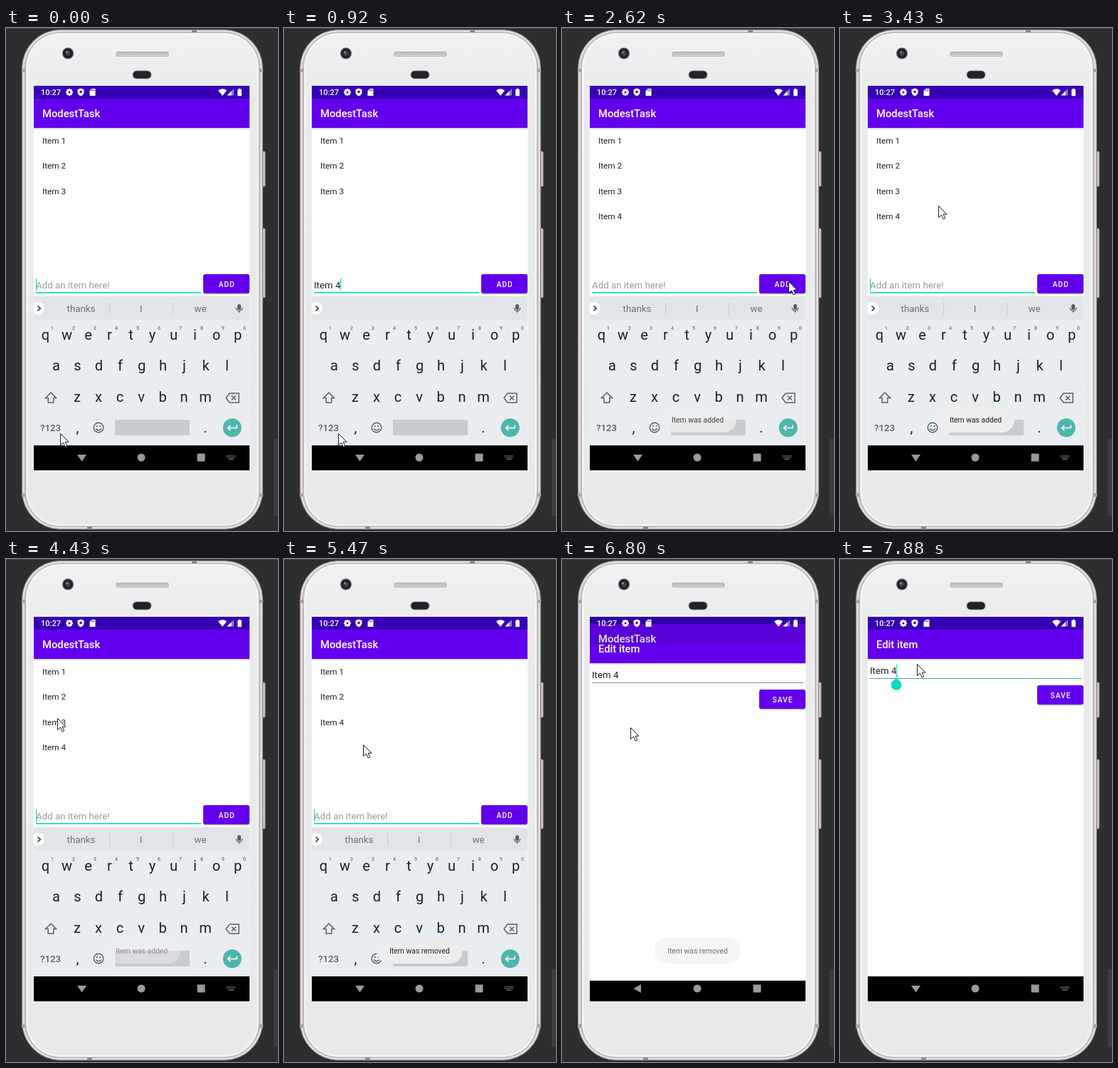
Write an HTML page with a canvas that moves like this. It is 382 px wide and 705 px high and loops after 8 s.

```html
<!DOCTYPE html>
<html lang="en">
<head>
<meta charset="utf-8">
<title>Todo demo</title>
<style>
  html, body { margin: 0; width: 100%; height: 100%; overflow: hidden; background: #2d2e30; }
  canvas { display: block; width: 382px; height: 705px; }
</style>
</head>
<body>
<canvas id="stage"></canvas>
<script>
const W = 382, H = 705, LOOP = 8000;
const PURPLE = '#6200ee', DEEP = '#3700b3', TEAL = '#03dac5', INK = '#212121', KEY = '#10242e', KEY_ICON = '#53626a';
const canvas = document.getElementById('stage');
const c = canvas.getContext('2d');
const dpr = window.devicePixelRatio || 1;
canvas.width = W * dpr;
canvas.height = H * dpr;

const clamp = v => Math.max(0, Math.min(1, v));
const ramp = (t, start, length) => clamp((t - start) / length);

const BURSTS = [[0, 0, 1], [120, 370, 3], [640, 640, 1], [920, 920, 1], [1190, 1920, 6],
  [2210, 2470, 3], [2620, 3130, 5], [3290, 4270, 8], [4430, 5470, 9], [5630, 6280, 6],
  [6680, 6680, 1], [6800, 7610, 7], [7740, 7880, 2]];
const TICKS = BURSTS.flatMap(([a, b, n]) =>
  Array.from({ length: n }, (_, i) => n > 1 ? a + (b - a) * i / (n - 1) : a));
const snap = t => TICKS.filter(tick => tick <= t + 0.01).pop();

const MOUSE = [[0, 76, 568], [1060, 76, 568], [1340, 170, 500], [1630, 344, 349], [1920, 318, 355],
  [2700, 318, 355], [3130, 200, 282], [3700, 82, 220], [4000, 72, 223], [4950, 72, 223],
  [5470, 111, 260], [5900, 99, 228], [6200, 96, 236], [7050, 96, 236], [7610, 112, 152], [7740, 108, 147]];

const TYPING = [[0, '', ['thanks', 'I', 'we']], [120, 'I', ['I', "I'm", "I'll"]],
  [240, 'It', ['It', "It's", 'Its']], [370, 'Item', ['Items', 'Item', 'item']],
  [640, 'Item ', ['1', '2', 'is']], [920, 'Item 4', []], [2210, '', ['thanks', 'I', 'we']]];

function mouseAt(t) {
  const i = MOUSE.findIndex(m => m[0] > t);
  if (i < 0) return MOUSE[MOUSE.length - 1].slice(1);
  const a = MOUSE[i - 1], b = MOUSE[i], k = (t - a[0]) / (b[0] - a[0]);
  return [a[1] + (b[1] - a[1]) * k, a[2] + (b[2] - a[2]) * k].map(Math.round);
}

function rect(x, y, w, h, fill) {
  c.fillStyle = fill;
  c.fillRect(x, y, w, h);
}
function round(x, y, w, h, r, fill, stroke, line = 1) {
  c.beginPath();
  c.roundRect(x, y, w, h, r);
  if (fill) { c.fillStyle = fill; c.fill(); }
  if (stroke) { c.strokeStyle = stroke; c.lineWidth = line; c.stroke(); }
}
function disc(x, y, r, fill) {
  c.beginPath();
  c.arc(x, y, r, 0, Math.PI * 2);
  c.fillStyle = fill;
  c.fill();
}
function text(s, x, y, size, fill, { weight = 400, align = 'left', spacing = 0 } = {}) {
  c.font = `${weight} ${size}px Roboto, sans-serif`;
  c.textAlign = align;
  c.letterSpacing = spacing + 'px';
  c.fillStyle = fill;
  c.fillText(s, x, y);
  const width = c.measureText(s).width;
  c.letterSpacing = '0px';
  return width;
}
function icon(path, x, y, fill, stroke, line = 1.4) {
  c.save();
  c.translate(x, y);
  const p = new Path2D(path);
  if (fill) { c.fillStyle = fill; c.fill(p); }
  if (stroke) { c.strokeStyle = stroke; c.lineWidth = line; c.stroke(p); }
  c.restore();
}
function layer(alpha, draw) {
  c.save();
  c.globalAlpha *= alpha;
  draw();
  c.restore();
}

function phone() {
  rect(0, 0, W, H, '#2d2e30');
  rect(0, 0, W, 1, '#45474a');
  round(376, 575, 12, 109, 3, '#3c3d3f');
  [[173, 49], [281, 97]].forEach(([y, h]) => round(359.5, y, 4.5, h, 1.5, '#cfc8cb', '#8f868a'));
  round(22.5, 2.5, 338, 700, 54, '#cbc4c7', '#8a8185');
  round(24.5, 4.5, 334, 696, 52, null, '#eae5e7', 1.5);
  const body = c.createLinearGradient(0, 5, 0, 700);
  body.addColorStop(0, '#f1f1f2');
  body.addColorStop(0.15, '#e9eaec');
  body.addColorStop(1, '#e8e9eb');
  round(27.5, 6.5, 328, 692, 49, body, '#b8afb3');
  round(29.5, 8.5, 324, 688, 47, null, '#f6f6f7', 2);
  rect(261, 2, 7, 4, '#8d8588');
  rect(114, 699, 7, 4, '#8d8588');
  [57, 652].forEach(y => { rect(22, y, 5, 5, '#aaa2a6'); rect(356, y, 5, 5, '#aaa2a6'); });

  disc(87, 35.5, 8, '#55575a');
  disc(87, 35.5, 6.8, '#202226');
  disc(87, 35.5, 3.5, '#3c4250');
  disc(85.5, 34, 1.4, '#8790a0');
  round(155, 33.5, 73, 6, 1.5, '#c1c2c4', '#a5a6a8', 0.8);
  rect(156, 38, 71, 1, '#dadbdc');
  round(178, 60, 26, 11, 5.5, '#222326', '#85878a', 0.8);
  round(38.5, 80.5, 304, 540, 0, null, '#f0f0f1');
}

function statusIcons() {
  text('10:27', 49, 94, 11, '#fff', { weight: 500 });
  for (let i = 0; i < 4; i++) {
    c.save();
    c.translate(89, 90);
    c.rotate(i * Math.PI / 4);
    rect(-1.2, -5, 2.4, 10, '#fff');
    c.restore();
  }
  disc(89, 90, 3.7, '#fff');
  disc(89, 90, 1.5, DEEP);
  icon('M0-5.5L4.5-3.7V0Q4 4 0 5.5Q-4 4-4.5 0V-3.7Z', 105, 90, '#fff');
  disc(105, 89.5, 1.8, DEEP);
  icon('M-1-5H4V5H-4V-2Z', 121.5, 90, '#fff');
  [-0.6, 1.2, 3].forEach(x => rect(120.3 + x, 86.3, 0.9, 2, DEEP));
  icon('M-6-2.5Q0-7 6-2.5L0 5Z', 304, 90, '#fff');
  icon('M4.5-5V4.5H-5Z', 315.5, 90, '#8f74d4');
  icon('M1-1.5V4.5H-5Z', 315.5, 90, '#fff');
  icon('M-1.3-5.2H1.3V-4H2.8V5.2H-2.8V-4H-1.3Z', 328, 90, '#fff');
}

function navIcons(typing) {
  const gray = '#9a9a9a';
  if (typing) {
    icon('M-6.5-4H6.5L0 5.5Z', 106.5, 602, gray);
    for (let i = 0; i < 12; i++) rect(310 + i % 6 * 2.1, 599 + Math.floor(i / 6) * 2.2, 1.3, 1.3, '#858585');
    rect(312.5, 603.6, 7, 1.2, '#858585');
  } else {
    icon('M5-6V6L-5.5 0Z', 106, 602, gray);
  }
  disc(190, 602, 5.5, gray);
  round(268.5, 596.5, 11, 11, 1, gray);
}

function windowBase(title) {
  rect(39, 81, 303, 539, '#fefefe');
  const shade = c.createLinearGradient(0, 140, 0, 143);
  shade.addColorStop(0, '#cccccc');
  shade.addColorStop(1, '#fefefe');
  rect(39, 140, 303, 3, shade);
  rect(39, 81, 303, 18, DEEP);
  rect(39, 99, 303, 41, PURPLE);
  text(title, 51, 125, 14.75, '#fff', { weight: 500 });
  rect(39, 585, 303, 35, '#000');
}

function button(label, y) {
  c.save();
  c.shadowColor = 'rgba(0,0,0,.3)';
  c.shadowBlur = 2;
  c.shadowOffsetY = 1;
  round(277, y, 65, 27, 3, PURPLE);
  c.restore();
  text(label, 310, y + 18, 10.3, '#fff', { weight: 500, align: 'center', spacing: 0.92 });
}

function keyboard(words) {
  rect(39, 376, 303, 209, '#e9edef');
  rect(39, 376, 303, 33, '#e1e5e8');
  disc(45, 393, 9, '#fff');
  icon('M-2-3.5L1.7 0L-2 3.5', 46.5, 393, null, '#26343b', 1.6);
  words.forEach((w, i) => text(w, [105.5, 189.5, 273][i], 398, 13.3, '#66727a', { align: 'center' }));
  if (words.length) [145, 234].forEach(x => rect(x, 384, 1, 18, '#c6ccd0'));
  round(325, 387, 5, 8, 2.5, KEY_ICON);
  icon('M-4.3 0Q-4 4.5 0 4.5Q4 4.5 4.3 0M0 4.5V7', 327.5, 392, null, KEY_ICON, 1.3);

  const row = (keys, x, y) => [...keys].forEach((k, i) =>
    text(k, x + i * 30, y, 20, KEY, { align: 'center' }));
  row('qwertyuiop', 55.5, 437);
  row('asdfghjkl', 70.5, 480);
  row('zxcvbnm', 100, 524);
  [...'1234567890'].forEach((d, i) =>
    text(d, 65 + i * 30, 422.5, 7.5, '#6b777e', { align: 'center', weight: 500 }));

  icon('M0-7.5L7.5 0H3.8V6.5H-3.8V0H-7.5Z', 63, 518.5, null, KEY_ICON, 1.5);
  icon('M-9 0L-4-6.5H9V6.5H-4ZM-1.2-3L5 3M5-3L-1.2 3', 318, 518.5, null, KEY_ICON, 1.5);
  text('?123', 48, 565, 13.3, KEY_ICON, { weight: 500 });
  text(',', 100.5, 567, 20, KEY, { align: 'center' });
  text('.', 280, 567, 20, KEY, { align: 'center' });
  icon('M6.8 0A6.8 6.8 0 1 1-6.8 0A6.8 6.8 0 1 1 6.8 0M-3.7 1.5Q0 6 3.7 1.5', 130, 560, null, KEY_ICON, 1.4);
  disc(127.6, 558, 1.1, KEY_ICON);
  disc(132.4, 558, 1.1, KEY_ICON);
  round(153, 549, 105, 22, 2, '#c8ccd1');
  disc(317.7, 560.3, 13, '#4db6ac');
  icon('M6.5-4V0H-6M-2.5-3.7L-6.2 0L-2.5 3.7', 317.7, 560.5, null, '#fff', 1.6);
}

function listScreen(t) {
  windowBase('ModestTask');
  const item = (n, slot, alpha = 1) =>
    layer(alpha, () => text('Item ' + n, 51, Math.round(162 + 35.4 * slot), 11.8, INK));
  item(1, 0);
  item(2, 1);
  item(3, 2, 1 - ramp(t, 4930, 120));
  const k = ramp(t, 5050, 250);
  item(4, 3 - k * k * (3 - 2 * k), ramp(t, 2200, 120));

  const [, typed, words] = TYPING.filter(s => s[0] <= t + 1).pop();
  let caret = 42;
  if (typed) caret += text(typed, 42, 365, 13.3, INK);
  else text('Add an item here!', 42, 365, 13.3, '#9b9b9b');
  if (typed && t < 639) rect(42, 367, caret - 42, 1, INK);
  rect(42, 370, 232, 1.6, TEAL);
  const blink = t < 920 || (t < 2210 ? (t - 920) % 1000 : t % 1000) < 500;
  if (blink) rect(Math.floor(caret), 351, 1.2, 17, TEAL);
  button('ADD', 345);
  if (t >= 2210) layer(0.22 * (1 - ramp(t, 2210, 380)), () => round(277, 345, 65, 27, 3, '#fff'));
  keyboard(words);
}

function editScreen(t) {
  const focused = t >= 7600;
  windowBase('Edit item');
  text('Item 4', 42, 161, 13.3, INK);
  rect(42, 167, 297, 1, focused ? '#4fa39d' : '#8b8b8b');
  button('SAVE', 177);
  if (focused) rect(79, 148, 1.2, 18, TEAL);
  if (t >= 7730) icon('M0-8.5L5.3-4A7.3 7.3 0 1 1-5.3-4Z', 79, 175.5, TEAL);
}

function toast(label, half, t, start, end) {
  const alpha = Math.min(ramp(t, start, 350), 1 - ramp(t, end, 400));
  if (alpha <= 0) return;
  layer(alpha, () => {
    round(190.5 - half, 531, half * 2, 36, 18, '#eeeeee');
    text(label, 190.5, 553, 10.35, '#1c1c1c', { align: 'center' });
  });
}

function render(t) {
  c.setTransform(dpr, 0, 0, dpr, 0, 0);
  phone();
  c.save();
  c.beginPath();
  c.rect(39, 81, 303, 539);
  c.clip();

  const k = t < 6680 ? 0 : ramp(t, 6600, 425);
  const glide = 1 - (1 - k) ** 2;
  if (k < 1) {
    c.save();
    c.translate(0, -Math.round(11 * glide));
    listScreen(t);
    c.restore();
    if (k > 0) rect(39, 81, 303, 539, 'rgba(0,0,0,.1)');
  }
  if (k > 0) {
    c.save();
    c.beginPath();
    c.rect(39, Math.round(81 + 539 * (1 - k) ** 4.13), 303, 539);
    c.clip();
    c.translate(0, Math.round(22 * (1 - glide)));
    editScreen(t);
    c.restore();
  }
  statusIcons();
  navIcons(k === 0 || t >= 7730);
  toast('Item was added', 54.5, t, 2340, 4200);
  toast('Item was removed', 60.5, t, 5130, 6640);
  c.restore();

  const [mx, my] = mouseAt(t);
  icon('M0 0V16L4 12.5L6.6 18.4L9.2 17.3L6.7 11.6H11.5Z', mx + 0.5, my + 0.5, '#fff', '#1a1a2a', 1);
}

function tick() {
  render(snap(performance.now() % LOOP));
  requestAnimationFrame(tick);
}
tick();
</script>
</body>
</html>
```
